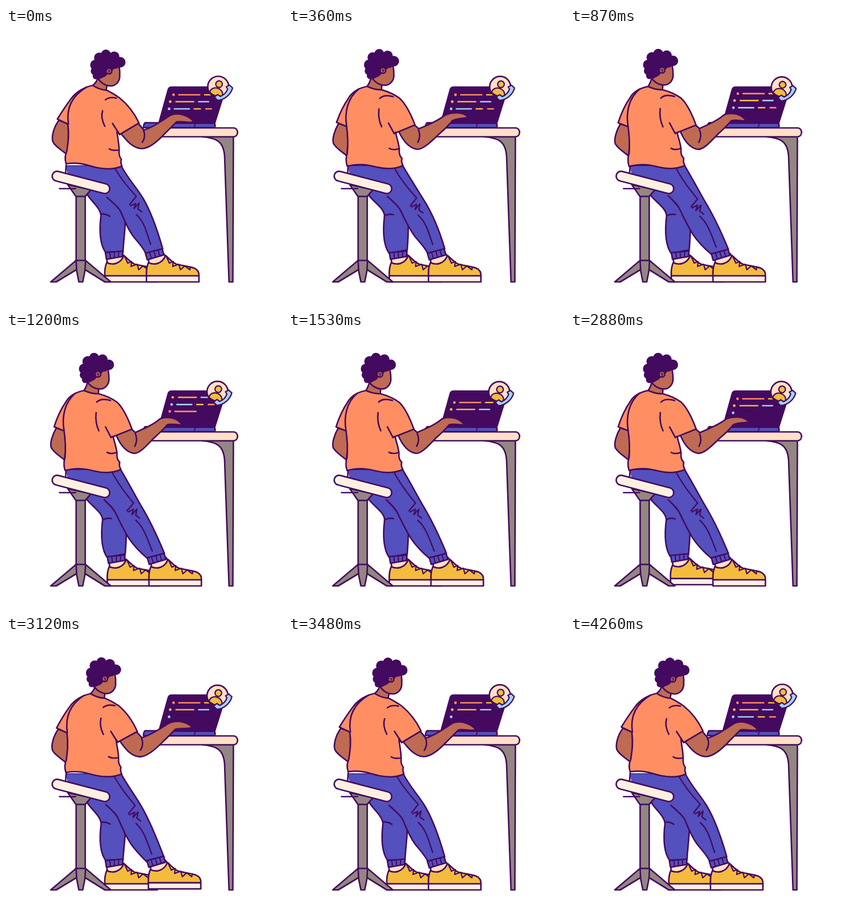
Animation, 500 px wide and 500 px high, one loop 4290 ms. Source, as an HTML page with a canvas:

```html
<!DOCTYPE html>
<html lang="en">
<head>
<meta charset="utf-8">
<title>Working at a laptop</title>
<style>
html, body { margin: 0; width: 100%; height: 100%; overflow: hidden; background: #fff; }
canvas { display: block; width: 500px; height: 500px; }
</style>
</head>
<body>
<canvas id="stage" width="500" height="500"></canvas>
<script>
const ctx = document.getElementById('stage').getContext('2d');
const LOOP = 4290;
const INK = '#440a5f', SKIN = '#bf6b53', SHIRT = '#ff8f62', DENIM = '#5450bd', GREY = '#938780';
const CREAM = '#fff0e0', PEACH = '#ffe1c6', YELLOW = '#f4bc3d', SKY = '#9cd4f7', LINE = 2.7;

const mix = (a, b, u) => a + (b - a) * u;
const clamp = v => Math.max(0, Math.min(1, v));
const ramp = (t, a, b) => clamp((t - a) / (b - a));
const ease = (t, a, b) => (1 - Math.cos(Math.PI * ramp(t, a, b))) / 2;
// goes 0 to 1 over a..b and back over c..d
const swing = (t, a, b, c, d) => ease(t, a, b) - ease(t, c, d);
// peaks at 1 halfway through a move
const arc = u => 4 * u * (1 - u);

function paint(path, fill, stroke = INK, width = LINE) {
  const p = typeof path === 'string' ? new Path2D(path) : path;
  if (fill) { ctx.fillStyle = fill; ctx.fill(p); }
  if (stroke) { ctx.strokeStyle = stroke; ctx.lineWidth = width; ctx.stroke(p); }
}

// Blends two poses of one path; weight(x, y) sets the blend per point
function morph(from, to, weight, lift) {
  const re = /-?\d+(\.\d+)?/g;
  const a = from.match(re).map(Number), b = to.match(re).map(Number);
  let i = 0, u = 0;
  return from.replace(re, () => {
    const odd = i % 2;
    if (!odd) u = weight(a[i], a[i + 1]);
    let v = mix(a[i], b[i], u);
    if (odd && lift) v -= lift(a[i - 1]);
    i++;
    return v.toFixed(2);
  });
}

function disc(x, y, r, fill, stroke, width) {
  const p = new Path2D();
  p.arc(x, y, r, 0, 7);
  paint(p, fill, stroke || null, width);
}

function seg(x1, y1, x2, y2, color, width) {
  paint(`M${x1},${y1} L${x2},${y2}`, null, color, width);
}

function moved(dx, dy, fn) {
  ctx.save();
  ctx.translate(dx, dy);
  fn();
  ctx.restore();
}

// Code lines: y, dot x, dot colour, then bars as [start, end, colour]
const ROWS = [
  [121, 303.5, SHIRT, [313, 351, SHIRT], [360, 373, YELLOW]],
  [133.5, 297.5, YELLOW, [308, 340, YELLOW], [349, 367, SKY]],
  [146.5, 295.5, SKY, [305, 332, SKY], [341, 352, YELLOW], [362, 372, SHIRT]]
];
const BLOCK = 38, SLANT = -0.3;

// dy shifts a row along the slanted screen; rows fade out near the top
function drawRow([y, x, color, ...bars], dy, part) {
  ctx.globalAlpha = ramp(y + dy, 116.5, 118.5);
  if (part <= 0 || !ctx.globalAlpha) return;
  moved(SLANT * dy, dy, () => {
    disc(x, y, 2.4, color);
    const end = mix(x, bars[bars.length - 1][1], part);
    for (const [a, b, c] of bars) if (end > a) seg(a, y, Math.min(b, end), y, c, 2.7);
  });
}

function drawCode(t) {
  const scroll = BLOCK * ease(t, 700, 1850);
  const typed = [
    ramp(t, 1000, 1250),
    ramp(t, 1250, 1500),
    0.08 * ramp(t, 2000, 2050) + 0.92 * ramp(t, 3520, 4150)
  ];
  ctx.save();
  ROWS.forEach((row, i) => {
    ctx.globalAlpha = 1;
    if (scroll < BLOCK) drawRow(row, -scroll, 1);
    ctx.globalAlpha = 1;
    drawRow(row, BLOCK - scroll, typed[i]);
  });
  ctx.restore();
}

function drawDesk() {
  paint('M355,197 C378,199 394,203 396,232 L404,460 L411,460 L412,197 Z', GREY);
  paint('M256,181 L412,181 C422,181 422,197 412,197 L256,197 Z', PEACH);
}

function drawLaptop(t) {
  paint('M252,171.5 L377,172.5 Q380,176 378,180.5 L249,180.5 Q249,174 252,171.5 Z', DENIM);
  paint('M300,107 L392,107 Q398,107 397,112 L378,172.5 L277,172.5 L294,111 Q295.5,107 300,107 Z', INK);
  seg(343, 173, 341, 180, INK, 2);
  drawCode(t);
}

function drawBadge(t) {
  const k = (1 - Math.cos(2 * Math.PI * t / LOOP)) / 2;
  moved(384.5 - 2.3 * k, 106.5 + 3 * k, () => {
    disc(0, 0, 19, PEACH, INK);
    ctx.save();
    ctx.rotate(0.3);
    paint('M-12,14 C-12,-1 12,-1 12,14 Q0,20 -12,14 Z', YELLOW, INK, 2.3);
    disc(0, -5, 6, YELLOW, INK, 2.3);
    ctx.restore();
    paint('M-7,18.5 L-1,14 L4,17.5 C10,15 15,10 17,4 L14.5,0 L20.5,-3 L26,2 C23,14 11,24 -1.5,24.5 Z', SKY, INK, 2.3);
  });
}

function drawStool() {
  paint('M127,421 L81,460 L91,460 L129,437 Z M144,421 L190,460 L179,460 L142,437 Z', GREY);
  paint('M127,421 L144,421 L143,440 L139,460 L132,460 L128,440 Z', GREY);
  paint('M127,305 L143.5,305 L143.5,421 L127,421 Z', GREY);
  paint('M112,284 L154,293 L143.5,305 L126.5,305 Z', GREY);
  seg(97, 291, 126, 291, INK, LINE);
  seg(92.5, 268.4, 179, 291, INK, 20.4);
  seg(92.5, 268.4, 179, 291, CREAM, 15);
}

function drawShoe() {
  paint('M4,414 L31,408 L38,418 L30,432 L5,430 Z', PEACH);
  paint('M0.5,449 C0,440 1,432 4,425 C14,430 29,428 35,412 C40,416 46,424 55,428 ' +
    'C68,431 80,432 87,435 C94,438 96,443 95.5,449 Z', YELLOW);
  paint('M36,413 L42,426 L49,423 L48,432 L59,428 L62,438 L70,431 L79,438 L80,433', null, INK, 2.3);
  paint('M0.5,449 L95.5,449 L95.5,460 L0.5,460 Z', CREAM);
}

// Corners: hem left, hem right, bottom right, bottom left
function drawCuff(x1, y1, x2, y2, x3, y3, x4, y4) {
  paint(`M${x1},${y1} L${x2},${y2} L${x3},${y3} L${x4},${y4} Z`, DENIM);
  for (const k of [0.25, 0.5, 0.75])
    seg(mix(x1, x2, k), mix(y1, y2, k), mix(x4, x3, k), mix(y4, y3, k), INK, 2.1);
}

function drawLegs(body, back, front) {
  const knee = foot => (x, y) => mix(body, foot, clamp((y - 260) / 145));
  const wb = knee(back), wf = knee(front);
  const stepB = -2.6 * arc(back), stepF = -2.6 * arc(front);

  moved(mix(178.5, 183, back), stepB, drawShoe);
  paint(morph('M110,250 L146,300 C156,316 171,326 172,340 C169,365 169,390 180,406 L212,405 C213,385 216,365 216,350 L208,250 Z',
    'M110,250 L146,303 C156,316 174,326 175,340 C172,365 172,392 183,408 L216,402 C217,390 218,375 218,358 L208,250 Z', wb), DENIM);
  paint(morph('M173,337 Q180,336 188,341', 'M176,340 Q183,336 191,338', wb));
  moved(3.6 * back, stepB, () => drawCuff(180, 407, 212, 404, 211, 414, 182, 419));

  moved(mix(254, 258.5, front), stepF, drawShoe);
  const fromEdge = 'M183,307 C196,318 205,326 208,333 C216,352 222,366 231,378 C238,387 248,397 253,408';
  const toEdge = 'M178,304 C188,314 195,320 199,329 C207,346 213,358 222,373 C232,388 244,400 256,410';
  const fromSide = ' L284,400 C276,372 264,335 248,308 C236,288 220,272 209,250';
  const toSide = ' L287,401 C275,372 259,338 243,312 C230,289 219,268 208,250';
  const rest = ' L108,250 L112,266 L150,280 Z';
  paint(morph(fromEdge + fromSide + rest, toEdge + toSide + rest, wf), DENIM, null);
  paint(morph(fromEdge + fromSide, toEdge + toSide, wf));
  paint('M109,248 L108,262');
  paint(morph('M197,254 C207,271 220,288 236,305 L224,320 M226,322 L235,318 L232,327 L241,317 L239,328 L246,333',
    'M192,254 C203,275 216,292 231,310 L219,324 M221,326 L231,321 L228,331 L237,321 L235,332 L242,337', wf), null, INK, 2.4);
  paint(morph('M236,338 C250,350 254,368 262,392', 'M235,341 C251,355 257,378 265,397', wf), null, INK, 2.4);
  moved(3.5 * front, front + stepF, () => drawCuff(252.5, 408, 283, 400, 286, 411, 256, 420));
}

function drawTorso(body, hand) {
  const wb = () => body;
  const wa = x => mix(body, hand, clamp((x - 240) / 60));
  const raise = 8 * arc(hand);

  paint(morph('M96,167 C86,180 82,198 85,206 C88,214 102,222 110,229 L113,205 L113,174 Z',
    'M91,174 C84,186 79,202 82,210 C87,219 98,225 106,232 L108,210 L106,179 Z', wb), SKIN);
  paint(morph('M167,88 Q165,98 157,104 L170,116 L181,114 L184,100 Z',
    'M148,88 Q146,98 141,106 L154,116 L167,114 L168,98 Z', wb), SKIN);
  paint(morph('M208,191 C218,203 228,217 245,218.5 C258,219 275,205 288,191 C296,183 302,177 309,170 ' +
    'C318,168 330,173 341,170 C335,163 328,159 316,156 C308,155 300,156 295,160 C280,170 265,180 250,185 L238,171 Z',
    'M199,186 C206,203 217,218 232,220 C243,220 258,202 268,192 C276,185 284,178 292,168 ' +
    'C298,166 307,167 319,169 C317,164 311,159 302,156 C292,154 285,154 278,158 C268,167 252,174 234,182 L226,175 Z',
    wa, x => raise * clamp((x - 305) / 35)), SKIN);
  paint(morph('M249,185 Q254,196 247,207', 'M234,184 Q239,196 233,207', wb));

  paint(morph('M157,104 C141,107 126,117 118,128 C109,140 101,152 93,165 L112,174 C115,195 112,210 110,224 Q105,234 109,246 ' +
    'C135,242 150,250 165,253 C180,256 197,256 210,250 Q207,243 209,238 Q204,232 205,222 C205,210 202,198 201,187 ' +
    'L206,193 L241,172 C233,155 220,138 205,126 Q193,118 183,113 Q169,112 157,104 Z',
    'M141,106 C126,109 114,116 108,127 C99,140 92,156 87,172 L105,179 C108,198 108,212 107,227 Q103,239 107,251 ' +
    'C130,245 145,248 161,252 C178,256 195,255 208,249 Q204,242 206,236 Q200,230 201,220 C200,208 196,200 194,189 ' +
    'L190,191 L228,176 C221,157 213,138 201,127 Q187,117 168,112 Q154,112 141,106 Z', wb), SHIRT);
  paint(morph('M146,107 C124,120 108,140 113,174', 'M125,111 C105,128 101,155 105,179', wb));
  paint(morph('M193,173 L206,193 M175,150 Q171,162 179,178 M180,130 Q188,124 200,127 M187,219 Q193,223 204,221',
    'M180,172 L190,191 M163,146 Q161,164 168,179 M164,127 Q172,119 189,124 M183,218 Q190,222 201,218', wb));
}

const CURLS = [[181, 48, 9], [169, 54, 9.5], [196, 52, 9.5], [207, 62, 9.5], [162, 67, 9.5], [161, 78, 7.5],
  [163, 87, 6], [182, 64, 17], [172, 76, 14], [198, 64, 10], [189, 67, 10]];

function drawHead(u) {
  ctx.save();
  ctx.translate(182 - 19.2 * u, 100 - 1.4 * u);
  ctx.rotate(-0.052 * u);
  ctx.translate(-182, -100);
  paint('M178,68 L205,68 C206,75 206.5,82 206,89 C205,98 198,105 190,105 C180,105 171,99 166,90 Z', SKIN);
  for (const [x, y, r] of CURLS) disc(x, y, r, INK);
  paint('M163,86 L166,94 L175,90 L182,84 L188,70 Z', INK, null);
  disc(186.5, 78, 5.2, SKIN, INK);
  paint('M185,77.5 Q187,75.5 188,78.5 L186.5,80.5', null, INK, 1.8);
  ctx.restore();
}

function draw(now) {
  const t = now % LOOP;
  const drift = 0.95 + 0.025 * (1 - Math.cos(2 * Math.PI * t / LOOP));
  const body = swing(t, 0, 460, 2830, 3265) * drift;
  const head = swing(t, 0, 540, 2850, 3320) * drift;
  const hand = swing(t, 0, 600, 2700, 3265);
  const back = swing(t, 0, 340, 2740, 3110);
  const front = swing(t, 370, 740, 2980, 3420);

  ctx.fillStyle = '#fff';
  ctx.fillRect(0, 0, 500, 500);
  ctx.lineCap = ctx.lineJoin = 'round';
  drawDesk();
  drawLaptop(t);
  drawBadge(t);
  drawLegs(body, back, front);
  drawStool();
  drawTorso(body, hand);
  drawHead(head);
}

const start = performance.now();
function tick() {
  draw(performance.now() - start);
  requestAnimationFrame(tick);
}
tick();
</script>
</body>
</html>
```
